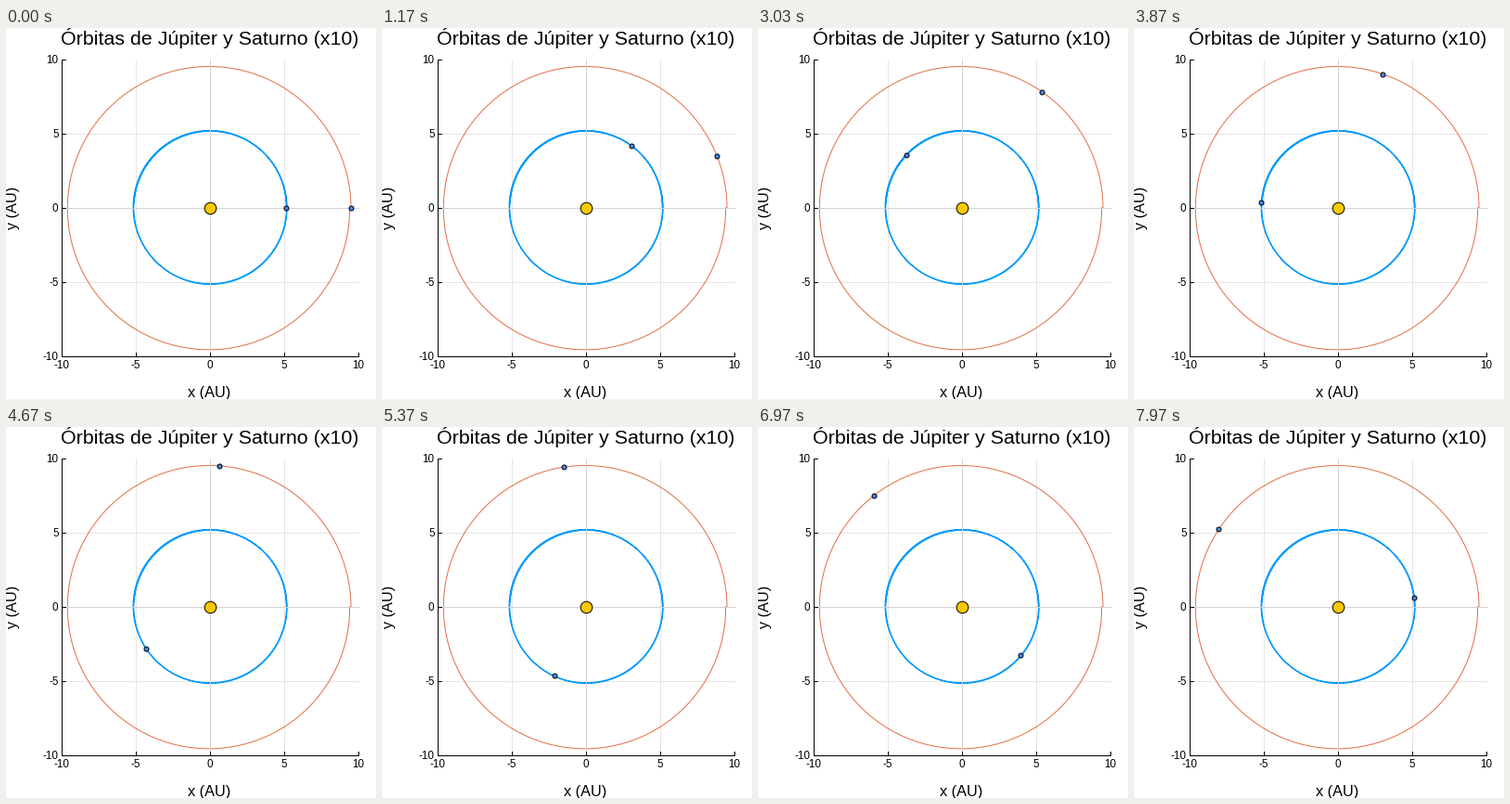
Recreate the animation shown at these times as a matplotlib script. Size 399 by 400 pixels, loop 8 s.

```python
import matplotlib.pyplot as plt
import numpy as np
from matplotlib.animation import FuncAnimation

W, H, DPI = 399, 400, 64
PX = 72 / DPI                      # one pixel in points
CX, CY, AU = 219.5, 193.5, 16      # sun position and pixels per AU
LEFT, RIGHT, TOP, BOTTOM = 59.5, 379.5, 33.5, 353.5
FRAMES, LOOP = 240, 8000

plt.rcParams["font.family"] = "Liberation Sans"
fig = plt.figure(figsize=(W / DPI, H / DPI), dpi=DPI, facecolor="white")
ax = fig.add_axes([0, 0, 1, 1])
ax.set_xlim(0, W)
ax.set_ylim(H, 0)
ax.axis("off")


def line(x, y, color, z, width=1.0, **kw):
    ax.plot(x, y, color=color, lw=width * PX, zorder=z, **kw)


def text(x, y, s, size, ha="center", va="baseline", **kw):
    ax.text(x, y, s, fontsize=size * PX, ha=ha, va=va, color="black", **kw)


def jupiter_radius(a):
    drift = np.clip(a / (2 * np.pi) - 0.6, 0, 1)
    return (82.6 + 0.45 * np.cos(a - np.radians(60))
            - 1.0 * drift * np.cos(a - np.radians(135)))


def saturn_radius(a):
    return (152.9 - 0.4 * np.cos(a) - 0.9 * np.sin(a)
            - 1.4 * (a / (2 * np.pi)) ** 4)


def jupiter_angle(n):
    mean = np.radians(1.533 * n)
    lag = np.radians(80)
    return mean - np.radians(0.82) * (np.sin(mean - lag) + np.sin(lag))


def saturn_angle(n):
    return np.radians(0.615 * n)


def place(radius, a):
    r = radius(a)
    return CX + r * np.cos(a), CY - r * np.sin(a)


def orbit(radius, turns, color, width):
    a = np.linspace(0, 2 * np.pi * turns, int(500 * turns))
    line(*place(radius, a), color, 3, width)


def marker(size, color):
    return ax.plot([], [], "o", ms=size * PX, mfc=color, mec="black",
                   mew=1.0 * PX, zorder=6)[0]


# Grid, axes and tick labels
for v in (-10, -5, 0, 5, 10):
    x, y = CX + v * AU, CY - v * AU
    if abs(v) == 5:
        line([x, x], [TOP, BOTTOM], "#e5e5e5", 1)
        line([LEFT, RIGHT], [y, y], "#e5e5e5", 1)
    line([x, x], [BOTTOM - 4, BOTTOM], "black", 5)
    line([LEFT, LEFT + 4], [y, y], "black", 5)
    text(x, 367, str(v), 11.6)
    text(56.5, y + 4.2, str(v), 11.6, ha="right")

line([CX, CX], [TOP, BOTTOM], "#d2d2d2", 4)
line([LEFT, RIGHT], [CY, CY], "#d2d2d2", 4)
line([LEFT, LEFT, RIGHT], [TOP, BOTTOM, BOTTOM], "black", 5,
     solid_capstyle="projecting")

text(CX, 18, "Órbitas de Júpiter y Saturno (x10)", 21.4)
text(CX, 398, "x (AU)", 16.2)
text(15, CY, "y (AU)", 16.2, ha="right", va="center", rotation=90)

orbit(jupiter_radius, 2.49, "#009afa", 1.2)
orbit(saturn_radius, 1, "#e26f46", 1.0)

sun = marker(12.6, "#ffc800")
sun.set_data([CX], [CY])
jupiter = marker(5, "#4488ee")
saturn = marker(5, "#4488ee")


def draw(n):
    for planet, radius, angle in ((jupiter, jupiter_radius, jupiter_angle),
                                  (saturn, saturn_radius, saturn_angle)):
        x, y = place(radius, angle(n))
        planet.set_data([x], [y])
    return jupiter, saturn


anim = FuncAnimation(fig, draw, frames=FRAMES, interval=LOOP / FRAMES,
                     repeat=True, repeat_delay=0)
plt.show()
```
